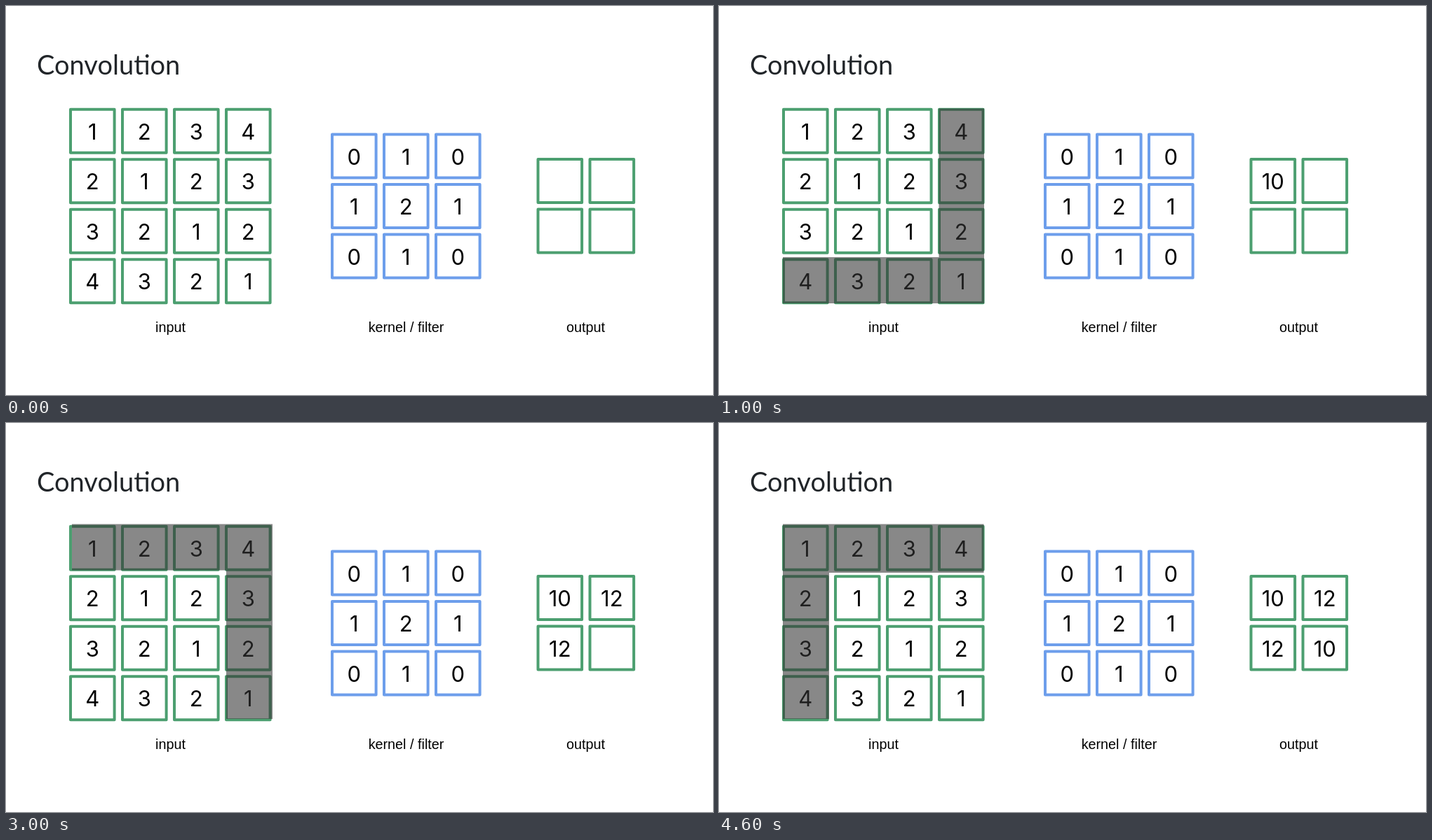
Write an HTML page that moves like this. It is 1008 px wide and 556 px high and loops after 5000 ms.

```html
<!DOCTYPE html>
<html lang="en">
<head>
<meta charset="utf-8">
<title>Convolution</title>
<style>
  html, body { margin: 0; width: 100%; height: 100%; overflow: hidden; background: #fff; }
  svg { display: block; width: 100%; height: 100%; }
  .title { font: 38px Lato, sans-serif; fill: #212529; }
  .digit { font: 31px Inter, sans-serif; text-anchor: middle; }
  .label { font: 19.8px "Liberation Sans", Arial, sans-serif; text-anchor: middle; }
  .cell { fill: none; stroke-width: 4; stroke-linejoin: round; }
  .green { stroke: #4c9f70; }
  .blue { stroke: #6d9eeb; }
  .mask { fill: #363636; fill-opacity: .59; }
  .mask, .result { opacity: 0; animation: 5s step-end infinite; }
  .mask { animation-name: turn; animation-delay: calc(var(--step) * 1s); }
  @keyframes turn { 0% { opacity: 1 } 20%, 100% { opacity: 0 } }
  @keyframes from1 { 0% { opacity: 0 } 20%, 100% { opacity: 1 } }
  @keyframes from2 { 0% { opacity: 0 } 40%, 100% { opacity: 1 } }
  @keyframes from3 { 0% { opacity: 0 } 60%, 100% { opacity: 1 } }
  @keyframes from4 { 0% { opacity: 0 } 80%, 100% { opacity: 1 } }
</style>
</head>
<body>
<svg id="stage" viewBox="0 0 1008 556">
  <text class="title" x="44" y="97.5">Convolution</text>
  <text class="label" x="234.5" y="466">input</text>
  <text class="label" x="570.5" y="466">kernel / filter</text>
  <text class="label" x="826.5" y="466">output</text>
</svg>
<script>
  const stage = document.getElementById("stage");
  const pitchX = 74, pitchY = 71.5, width = 62.6, height = 62;

  function add(tag, attributes, text = "") {
    const node = document.createElementNS("http://www.w3.org/2000/svg", tag);
    for (const name in attributes) node.setAttribute(name, attributes[name]);
    node.textContent = text;
    return stage.appendChild(node);
  }

  function grid(left, top, color, rows, decorate = () => {}) {
    rows.forEach((row, r) => row.forEach((value, c) => {
      const x = left + c * pitchX, y = top + r * pitchY;
      add("rect", { class: "cell " + color, x, y, width, height });
      const digit = add("text", { class: "digit", x: x + width / 2, y: y + height / 2 + 12 }, value);
      decorate(digit, r * row.length + c + 1);
    }));
  }

  const input = [[1, 2, 3, 4], [2, 1, 2, 3], [3, 2, 1, 2], [4, 3, 2, 1]];
  const kernel = [[0, 1, 0], [1, 2, 1], [0, 1, 0]];
  const convolve = (row, col) => kernel.flat().reduce(
    (sum, k, i) => sum + k * input[row + Math.floor(i / 3)][col + i % 3], 0);
  const output = [0, 1].map(row => [0, 1].map(col => convolve(row, col)));

  grid(92, 147.7, "green", input);
  grid(465, 183.5, "blue", kernel);
  grid(758.5, 219, "green", output, (digit, step) => {
    digit.classList.add("result");
    digit.style.animationName = "from" + step;
  });

  // L-shaped shades over the input cells outside the current window
  [
    "M313.5 146.5H378V425H91V359H313.5Z",
    "M93 146.5H159V359H380V425H93Z",
    "M94 144.5H380V423H314V210.5H94Z",
    "M91 144.5H377.5V214H157V423H91Z"
  ].forEach((d, i) => add("path", { class: "mask", d, style: `--step:${i + 1}` }));
</script>
</body>
</html>
```
